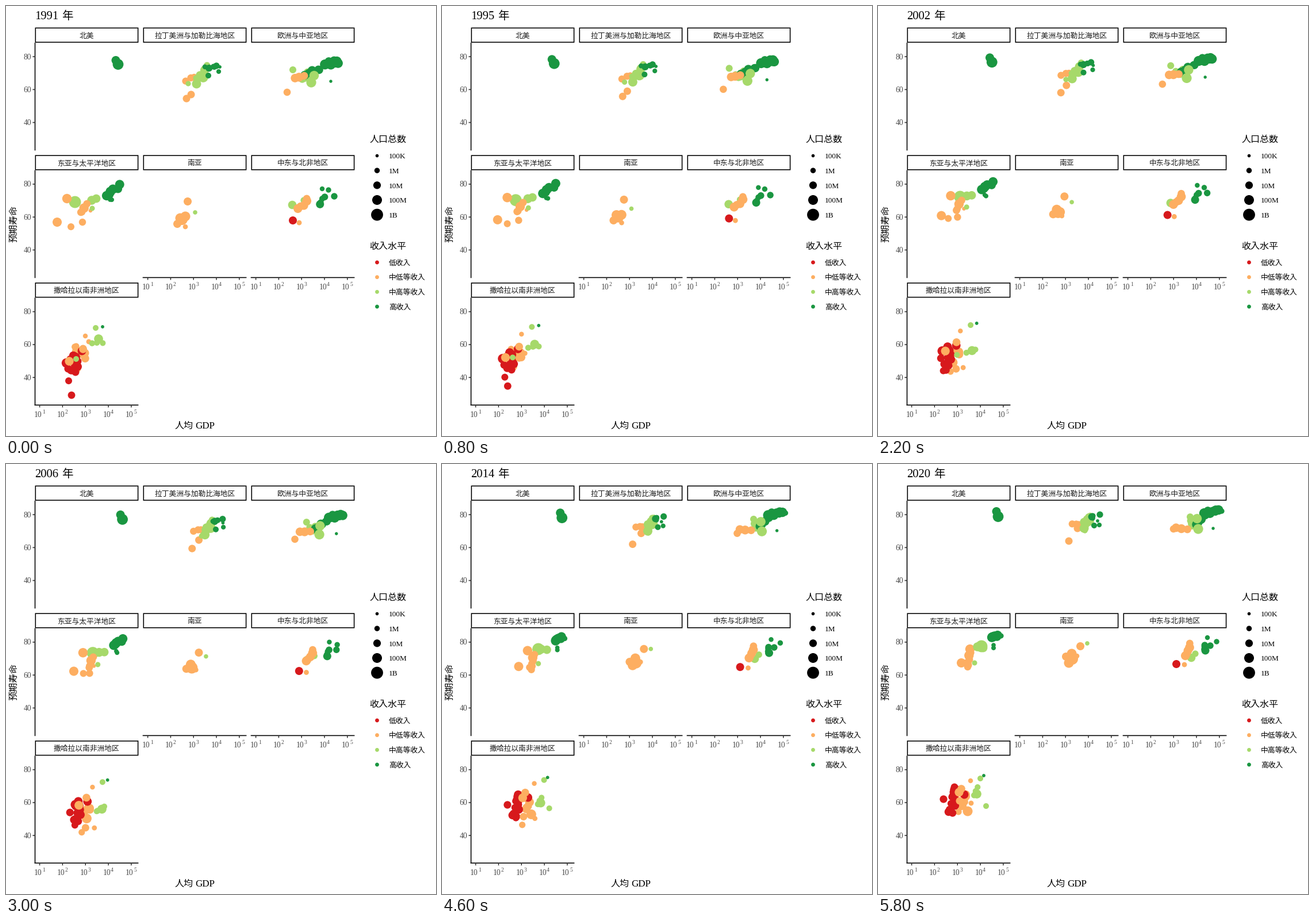
A matplotlib script that plays this animation: 748x748 px, repeating every 6 s.

```python
import numpy as np
import matplotlib.pyplot as plt
from matplotlib.animation import FuncAnimation
from matplotlib.patches import Rectangle

SIZE, DPI, YEARS = 748, 100, 30
PT = 72 / DPI
LOW, MID, UPPER, HIGH = "#D7191C", "#FDAE61", "#A6D96A", "#1A9641"
GREY, INK = "#4D4D4D", "#333333"
LINE = 1.58

plt.rcParams["font.family"] = ["Liberation Serif", "Noto Sans CJK JP"]
plt.rcParams["path.snap"] = False
fig = plt.figure(figsize=(SIZE / DPI, SIZE / DPI), dpi=DPI, facecolor="white")
ax = fig.add_axes([0, 0, 1, 1])
ax.set(xlim=(0, SIZE), ylim=(SIZE, 0))
ax.axis("off")
rng = np.random.default_rng(7)


def label(x, y, text, px, color="black", ha="left", va="baseline", **kw):
    return ax.text(x, y, text, fontsize=px * PT, color=color, ha=ha, va=va, **kw)


def line(xs, ys, color="black"):
    ax.plot(xs, ys, color=color, lw=LINE * PT, solid_capstyle="butt")


def dots(xs, ys, radii, colors):
    return ax.scatter(xs, ys, s=(2 * PT * np.asarray(radii)) ** 2,
                      c=colors, linewidths=0, zorder=3)


# ---- facets ----
LEFT, TOP, STEP_X, STEP_Y = 50.5, 37.5, 188, 221.8
WIDTH, STRIP, PANEL = 179.9, 26.3, 213.1
NAMES = ["北美", "拉丁美洲与加勒比海地区", "欧洲与中亚地区", "东亚与太平洋地区",
         "南亚", "中东与北非地区", "撒哈拉以南非洲地区"]


def x_axis(x, y):
    line([x - LINE / 2, x + WIDTH], [y, y])
    for k in range(1, 6):
        cx = x + 8.1 + 39.8 * (k - 1)
        line([cx, cx], [y, y + 4.1], INK)
        label(cx - 9.5, y + 20.6, "10", 13.6, GREY)
        label(cx + 4.3, y + 14.6, str(k), 9.6, GREY)


def y_axis(x, y):
    line([x, x], [y + STRIP, y + PANEL + LINE / 2])
    for value in (80, 60, 40):
        cy = y + 50.6 + (80 - value) * 2.863
        line([x - 4.1, x], [cy, cy], INK)
        label(x - 6.6, cy + 4.5, str(value), 13.6, GREY, "right")


for i, name in enumerate(NAMES):
    row, col = divmod(i, 3)
    x, y = LEFT + col * STEP_X, TOP + row * STEP_Y
    ax.add_patch(Rectangle((x + LINE / 2, y + LINE / 2), WIDTH - LINE, STRIP - LINE,
                           fill=False, lw=LINE * PT, joinstyle="miter"))
    label(x + WIDTH / 2, y + 18, name, 12.8, "#1A1A1A", "center")
    if col == 0:
        y_axis(x, y)
    if i > 3:
        x_axis(x, y + PANEL)

# ---- titles and legends ----
year = label(50.5, 22.5, "1991", 20.6)
label(97.5, 22.5, "年", 19.5)
label(293.5, 735, "人均", 16)
label(329.5, 735, "GDP", 17)
label(14.5, 379, "预期寿命", 16, ha="center", va="center", rotation=90)


def legend(y, title, texts, radii, colors, px):
    label(632.5, y, title, 16)
    ys = y + 23.5 + 25.65 * np.arange(len(texts))
    dots([645.5] * len(texts), ys, radii, colors)
    for cy, text in zip(ys, texts):
        label(665.8, cy + 4.8, text, px)


legend(237, "人口总数", ["100K", "1M", "10M", "100M", "1B"],
       2.8 + 1.9 * np.arange(5), "black", 13.3)
legend(422.5, "收入水平", ["低收入", "中低等收入", "中高等收入", "高收入"],
       [3.4] * 4, [LOW, MID, UPPER, HIGH], 12.8)

# ---- bubbles ----
t = np.linspace(0, 1, YEARS)
u = np.clip((t - 0.2) / 0.6, 0, 1)
STEADY = t
BOOM = 0.1 * t + 0.9 * u * u * (3 - 2 * u)  # slow nineties, fast two-thousands
bubbles = []


def solo(color, radius, start, end, dip=0, pace=BOOM):
    """One bubble: income follows pace, life expectancy is linear with a mid dip."""
    xs = start[0] + (end[0] - start[0]) * pace
    ys = start[1] + (end[1] - start[1]) * t + dip * np.sin(np.pi * t)
    bubbles.append((color, radius, xs, ys))


def swarm(color, n, radii, start, end, jitter, **kw):
    """n bubbles strung along a segment that moves from start to end."""
    start, end = np.array(start, float), np.array(end, float)
    for f in np.linspace(0, 1, n):
        shift, drift = rng.uniform(-jitter, jitter, (2, 2))
        solo(color, rng.uniform(*radii),
             start[0] + f * (start[1] - start[0]) + shift,
             end[0] + f * (end[1] - end[0]) + (shift + drift) / 2, **kw)


# North America
solo(HIGH, 7.5, (191, 94.5), (206, 82.5))
solo(HIGH, 9.4, (195, 101.5), (209, 91.5))

# Latin America
solo(MID, 6.5, (314, 161), (332, 134))
solo(MID, 6.5, (322, 154), (347, 112))
swarm(MID, 3, (6, 6.4), [(312, 129), (328, 125)], [(337, 104), (350, 106)], 2)
solo(UPPER, 4.6, (317, 135), (360, 116))
swarm(UPPER, 11, (5, 8), [(331, 131), (352, 104)], [(357, 109), (369, 90)], 4.5)
solo(UPPER, 8.8, (343, 124), (367, 99))
swarm(HIGH, 5, (4, 6.4), [(345, 107), (365, 104)], [(370, 94), (375, 89)], 3)
solo(HIGH, 5, (352, 121), (376, 107))
solo(HIGH, 5.6, (366, 104), (386, 88))
solo(HIGH, 2.9, (372, 106), (382, 99))
solo(HIGH, 4.1, (370, 114), (385, 106))

# Europe and Central Asia
solo(UPPER, 6, (499, 111), (543, 92))
swarm(UPPER, 8, (5.8, 7), [(508, 127), (530, 116)], [(543, 103), (552, 106)], 4.5)
swarm(HIGH, 6, (6.3, 7.8), [(520, 118), (546, 109)], [(554, 104), (569, 89)], 2.5)
swarm(HIGH, 11, (6.3, 8.8), [(555, 101), (579, 97)], [(567, 86), (592, 80)], 3.5)
solo(HIGH, 4.6, (576, 98), (598, 82))
solo(HIGH, 2.7, (565, 131), (583, 112))
solo(UPPER, 8.6, (531, 133), (557, 113))
solo(UPPER, 8.2, (536, 121), (555, 95))
solo(MID, 6.3, (489, 150), (514, 113))
swarm(MID, 3, (6.5, 8), [(502, 126), (519, 121)], [(518, 111), (538, 113)], 1)

# East Asia and Pacific
solo(MID, 8, (89, 376), (145, 346), pace=STEADY)
solo(UPPER, 10.4, (120, 341), (180, 317), pace=STEADY)
solo(MID, 8.2, (106, 335), (160, 322), pace=STEADY)
solo(MID, 6, (113, 384), (153, 346))
solo(MID, 6.2, (133, 376), (156, 353))
swarm(UPPER, 2, (7.3, 7.8), [(149, 338), (157, 335)], [(173, 318), (183, 320)], 0)
swarm(MID, 6, (5, 8.8), [(131, 361), (140, 346)], [(157, 350), (161, 328)], 3)
solo(MID, 3.3, (147, 356), (158, 347))
solo(UPPER, 4.5, (150, 352), (168, 346))
swarm(HIGH, 6, (6.3, 8.6), [(174, 332), (197, 312)], [(197, 302), (207, 298)], 2.5)
solo(HIGH, 4.6, (189, 321), (214, 299))
solo(HIGH, 4, (184, 337), (201, 320))
solo(HIGH, 3.8, (181, 337), (201, 315))

# South Asia
solo(MID, 8.5, (303, 369), (337, 330))
solo(MID, 10, (306, 371), (338, 339))
solo(MID, 8.5, (312, 366), (332, 346))
solo(MID, 7, (298, 379), (327, 335))
solo(MID, 4.3, (312, 384), (346, 334))
solo(MID, 7, (316, 340), (352, 317))
solo(UPPER, 3.8, (329, 359), (364, 312))

# Middle East and North Africa
solo(MID, 4.4, (510, 377), (533, 349))
solo(LOW, 7, (499, 373), (519, 348))
solo(UPPER, 7.3, (498, 346), (545, 337))
solo(UPPER, 5.6, (518, 338), (552, 330))
swarm(MID, 5, (6, 8), [(508, 353), (525, 337)], [(535, 335), (542, 314)], 2.5)
solo(HIGH, 4.2, (550, 318), (573, 302))
solo(HIGH, 4.7, (561, 320), (589, 309))
solo(HIGH, 5.7, (571, 331), (578, 316))
swarm(HIGH, 4, (5, 7.2), [(546, 345), (553, 331)], [(569, 325), (567, 315)], 1.5)

# Sub-Saharan Africa
swarm(MID, 8, (5.5, 7.5), [(122, 596), (138, 610)], [(148, 598), (152, 572)], 4, dip=8)
solo(MID, 8.5, (122, 630), (156, 604))
solo(MID, 5.6, (122, 592), (140, 605), dip=42)
swarm(LOW, 15, (6, 7.8), [(118, 632), (118, 605)], [(127, 603), (133, 566)], 7)
solo(LOW, 6.4, (114, 677), (133, 562))
solo(LOW, 6, (109, 652), (129, 606))
solo(LOW, 6.6, (108, 631), (114, 583))
solo(LOW, 8.2, (105, 621), (134, 566))
solo(LOW, 7.4, (132, 600), (150, 575))
solo(MID, 7.6, (110, 618), (141, 571))
solo(MID, 6.8, (134, 597), (145, 565))
solo(MID, 6.5, (134, 596), (142, 586), dip=42)
solo(MID, 4.4, (144, 584), (162, 590), dip=46)
solo(MID, 4.2, (138, 574), (161, 551))
swarm(UPPER, 3, (5, 5.3), [(150, 586), (168, 586)], [(167, 576), (173, 562)], 1, dip=22)
solo(UPPER, 5, (122, 614), (188, 595))
solo(UPPER, 7.8, (161, 579), (172, 574), dip=24)
solo(UPPER, 5, (156, 560), (178, 547))
solo(HIGH, 2.9, (168, 558), (184, 542))

colors, radii, xs, ys = zip(*bubbles)
spots = np.stack([xs, ys], axis=-1)
cloud = dots(*spots[:, 0].T, radii, colors)


def draw(n):
    year.set_text(str(1991 + n))
    cloud.set_offsets(spots[:, n])
    return year, cloud


anim = FuncAnimation(fig, draw, frames=YEARS, interval=200, repeat=True,
                     repeat_delay=0, blit=False)
plt.show()
```
